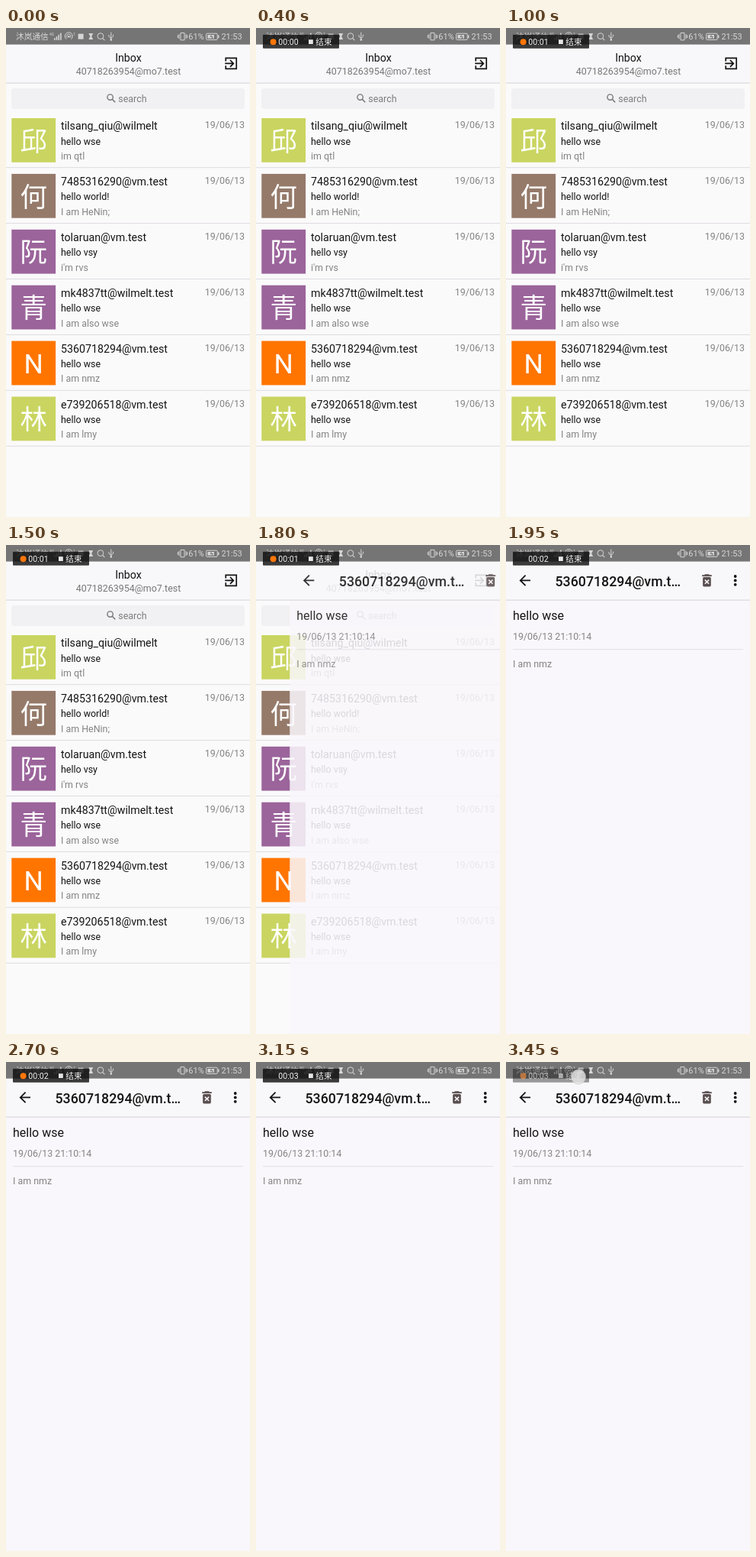
Write an HTML page that moves like this. It is 320 by 640 pixels and loops after 3.5 s.

```html
<!DOCTYPE html>
<html lang="zh-CN">
<head>
<meta charset="utf-8">
<title>Inbox</title>
<style>
  html, body { margin: 0; width: 100%; height: 100%; overflow: hidden; background: #fbfafb; }
  svg { display: block; width: 320px; height: 640px; }
  text { font-family: Roboto, "Noto Sans CJK SC", "Noto Sans CJK", sans-serif; white-space: pre; }
</style>
</head>
<body>
<svg id="stage" viewBox="0 0 320 640" xmlns="http://www.w3.org/2000/svg"></svg>
<script>
const LOOP = 3500, TICK = 50;
const INK = '#141414', GREY = '#848484', PALE = '#d6d6d6';
const LIME = '#c9d560', PLUM = '#9b649b';

const rows = [
  ['邱', LIME, 'tilsang_qiu@wilmelt', 'hello wse', 'im qtl'],
  ['何', '#957a6a', '7485316290@vm.test', 'hello world!', 'I am HeNin;'],
  ['阮', PLUM, 'tolaruan@vm.test', 'hello vsy', "i'm rvs"],
  ['青', PLUM, 'mk4837tt@wilmelt.test', 'hello wse', 'I am also wse'],
  ['N', '#ff7500', '5360718294@vm.test', 'hello wse', 'I am nmz'],
  ['林', LIME, 'e739206518@vm.test', 'hello wse', 'I am lmy']
];

const text = (s, x, y, size, fill, extra = '') =>
  `<text x="${x}" y="${y}" font-size="${size}" fill="${fill}" ${extra}>${s}</text>`;
const rect = (x, y, w, h, fill, extra = '') =>
  `<rect x="${x}" y="${y}" width="${w}" height="${h}" fill="${fill}" ${extra}/>`;
const line = (d, color, width, extra = '') =>
  `<path d="${d}" fill="none" stroke="${color}" stroke-width="${width}" ${extra}/>`;
const dot = (x, y, r, fill, extra = '') =>
  `<circle cx="${x}" cy="${y}" r="${r}" fill="${fill}" ${extra}/>`;
const ring = (x, y, r, color, width) =>
  `<circle cx="${x}" cy="${y}" r="${r}" fill="none" stroke="${color}" stroke-width="${width}"/>`;
const middle = 'text-anchor="middle"', end = 'text-anchor="end"';

function header() {
  return rect(0, 21, 320, 51, '#f8f7f9') + rect(0, 71.6, 320, 1, '#d3d1d4');
}

function mailRow([mark, color, from, subject, body], i) {
  const y = 118 + i * 72.9;
  return rect(7.3, y, 57.8, 57.8, color) +
    text(mark, 36.2, y + 42.6, 35.5, '#fff', middle + (mark === 'N' ? '' : ' font-weight="300"')) +
    text(from, 72, y + 15, 14.22, INK) +
    text('19/06/13', 313, y + 13.2, 12.44, GREY, end) +
    text(subject, 72, y + 34.5, 12.44, INK) +
    text(body, 72, y + 53.8, 12.44, GREY) +
    rect(0, y + 64.2, 320, 1, '#dddbde');
}

function inbox() {
  return rect(0, 0, 320, 640, '#fbfafb') + header() +
    text('Inbox', 160.5, 44, 14.22, INK, middle) +
    text('40718263954@mo7.test', 160.5, 61, 12.44, '#777', middle) +
    line('M288.2 43.6V39.4H302.2V53.4H288.2V49.2M287.2 46.4H297.6M294 42L298.3 46.4L294 50.8', INK, 1.7) +
    rect(7, 79, 306, 27, '#f1f0f2', 'rx="4"') +
    ring(136.6, 90.6, 3.7, '#777', 1.4) + line('M139.3 93.3L143.2 97.2', '#777', 1.6) +
    text('search', 147.3, 97, 12.44, '#7d7d7d') +
    rows.map(mailRow).join('');
}

function message() {
  return rect(0, 0, 320, 640, '#faf7fc') + header() +
    line('M32 46.4H19.2M25.6 39.6L18.8 46.4L25.6 53.2', INK, 1.8) +
    text('5360718294@vm.t…', 64.5, 53.5, 17.78, INK, 'font-weight="500"') +
    rect(257.2, 39.2, 12.6, 1.9, '#5b5051') + rect(260.6, 38.2, 5.8, 1.6, '#5b5051') +
    rect(258.1, 42, 10.7, 12.4, '#5b5051', 'rx="1.6"') +
    line('M260.9 45.6L266.1 50.8M266.1 45.6L260.9 50.8', '#f8f7f9', 1.5) +
    [41, 46.4, 51.8].map(y => dot(300.7, y, 1.9, INK)).join('') +
    text('hello wse', 9, 97.6, 16, INK) +
    text('19/06/13 21:10:14', 9, 124, 12.44, GREY) +
    rect(9, 136.2, 302, 1, '#e2dfe4') +
    text('I am nmz', 9, 159.6, 12.44, GREY);
}

function statusBar() {
  const bars = [0, 1, 2, 3].map(i => rect(63 + i * 2.7, 13.2 - i * 2.2, 1.6, 2.6 + i * 2.2, PALE)).join('');
  return rect(0, 0, 320, 21.6, '#757575') +
    text('沐岚通信', 13, 15.2, 10.7, PALE) +
    text('4G', 57, 9.5, 5, PALE) + bars +
    line('M79.2 14.6A5 5 0 1 1 85.4 14.6M80.4 12.6A2.7 2.7 0 1 1 84.2 12.6', PALE, 1) +
    dot(82.3, 11.2, 1.2, PALE) + text('1', 88, 10, 6, PALE) +
    rect(94.6, 7.6, 7, 7, PALE) +
    `<path d="M108.4 7H114.2L112.2 11L114.2 15H108.4L110.4 11Z" fill="${PALE}"/>` +
    ring(123.9, 10.6, 3.9, PALE, 1) + line('M126.6 13.4L129.4 16.2', PALE, 1.1) +
    line('M137.8 5.6V16M135 9V11.4L137.8 13.4L140.6 11V8.6', PALE, 1) + dot(137.8, 15.4, 1.3, PALE) +
    line('M229 6.4H234V15.8H229ZM227 8V14.2M236 8V14.2M225.4 9.2V13M237.6 9.2V13', PALE, 1) +
    text('61%', 239.3, 15.3, 11, PALE) +
    rect(262.6, 7.2, 14.6, 8.2, 'none', `rx="1" stroke="${PALE}"`) +
    rect(264.4, 9, 8.6, 4.6, PALE) + rect(278, 9.4, 1.4, 3.8, PALE) +
    line('M270.4 7.8L268 11.5H271.4L269.4 14.8', '#757575', 1) +
    text('21:53', 309.6, 15.3, 10.9, PALE, end);
}

function recorder() {
  return rect(9, 8.8, 100, 18, '#0c0c0c', 'fill-opacity=".8" rx="1"') +
    dot(22.6, 18.2, 4, '#ff7608', 'id="lamp"') +
    text('00:00', 29.3, 22.1, 10.6, '#f2f2f2', 'id="clock"') +
    rect(69, 15.2, 5.8, 5.8, '#e6e6e6') +
    text('结束', 78.3, 22.2, 10.6, '#f2f2f2');
}

const group = (id, body) => `<g id="${id}">${body}</g>`;
const $ = id => document.getElementById(id);
$('stage').innerHTML = inbox() + group('page', message()) + statusBar() +
  group('rec', recorder()) + dot(95, 19.4, 9.6, '#e9e9e9', 'id="touch" stroke="#bdbdbd" stroke-width=".8"');

// [time, value] steps; the last one reached holds
const steps = {
  rec: [[0, 0], [100, .35], [150, .7], [200, 1], [3400, .8], [3450, .5]],
  lamp: [[0, 1], [600, 0], [800, 1], [1100, 0], [1300, 1], [1950, 0],
         [2450, .4], [2500, .7], [2550, 1], [2950, 0], [3350, 1]],
  clock: [[0, '00:00'], [1000, '00:01'], [1950, '00:02'], [2950, '00:03']],
  touch: [[0, 0], [3350, .4], [3400, .75], [3450, .8]]
};
const at = (name, t) => steps[name].filter(s => s[0] <= t).pop()[1];

function draw(t) {
  const k = Math.min(1, Math.max(0, (t - 1500) / 450));
  const left = Math.pow(1 - k, 1.8);
  $('page').setAttribute('transform', `translate(${320 * left} 0)`);
  $('page').setAttribute('opacity', 1 - left);
  for (const id of ['rec', 'lamp', 'touch']) $(id).setAttribute('opacity', at(id, t));
  const label = at('clock', t);
  if ($('clock').textContent !== label) $('clock').textContent = label;
}

const start = performance.now();
function frame() {
  const t = (performance.now() - start) % LOOP;
  draw(Math.floor(t / TICK) * TICK);
  requestAnimationFrame(frame);
}
frame();
</script>
</body>
</html>
```
